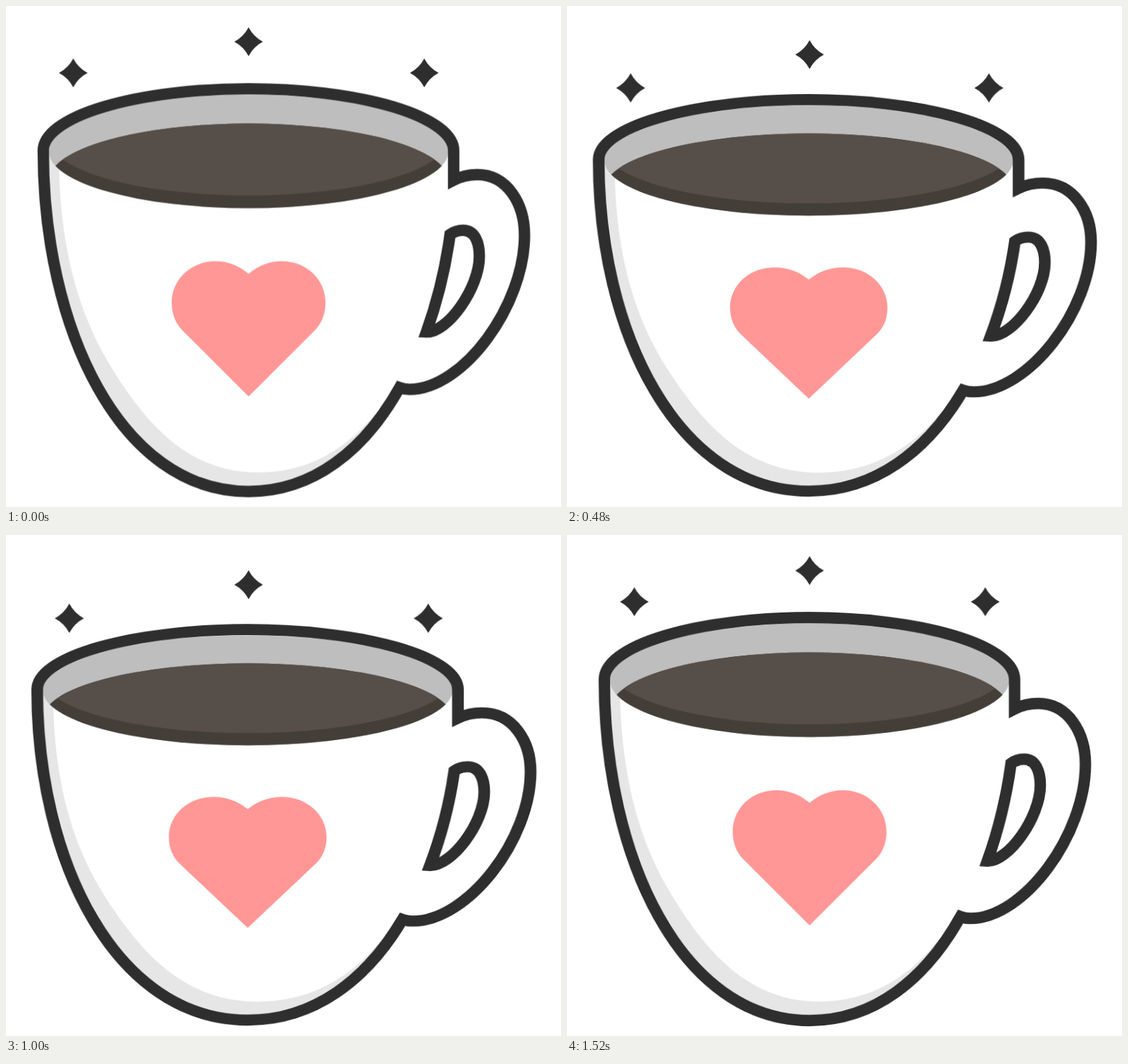
Recreate the animation shown at these times as an HTML page. Size 787 by 711 pixels, loop 1.56 s.

```html
<!DOCTYPE html>
<html lang="en">
<head>
<meta charset="utf-8">
<title>Coffee cup</title>
<style>
  html, body { margin: 0; width: 100%; height: 100%; overflow: hidden; background: #fff; }
  svg { display: block; width: 787px; height: 711px; }

  .cup, .star {
    animation: .78s cubic-bezier(.333, .118, .667, .452) -25ms infinite alternate;
  }
  .cup { animation-name: squash; transform-origin: 393.5px 670px; }
  .star { fill: #2e2e2e; animation-name: sink; transform: translate(var(--x), var(--y)); }
  .left { --x: 95.5px; --y: 94.4px; --dx: -10.5px; --dy: 43.5px; --s: 1.03; }
  .mid { --x: 344px; --y: 50.2px; --dx: 0px; --dy: 37.3px; --s: 1; }
  .right { --x: 593px; --y: 94.4px; --dx: 10.5px; --dy: 43.5px; --s: 1.03; }

  .line { fill: none; stroke: #2e2e2e; stroke-width: 16.2; stroke-linejoin: miter; }

  @keyframes squash {
    from { transform: scale(1); }
    to { transform: scale(1.0474, .943); }
  }
  @keyframes sink {
    from { transform: translate(var(--x), var(--y)) scale(1); }
    to {
      transform: translate(calc(var(--x) + var(--dx)), calc(var(--y) + var(--dy))) scale(var(--s));
    }
  }
</style>
</head>
<body>
<svg viewBox="0 0 787 711">
  <defs>
    <path id="spark" d="M0-20.5Q7-7 20.3 0Q7 7 0 20.5Q-7 7-20.3 0Q-7-7 0-20.5Z"/>
    <ellipse id="rim" cx="344" cy="206" rx="283" ry="80.6"/>
    <clipPath id="inRim"><use href="#rim"/></clipPath>
    <clipPath id="inCoffee"><use href="#rim" y="41"/></clipPath>
  </defs>

  <g class="cup">
    <!-- shade -->
    <path fill="#e6e6e6" d="M53 205C53 457 162 689 344 689
      C420 689 480 645 524 590V578C480 632 425 662 357 662
      C257 662 197 591 148 510C98 428 75 330 75 205Z"/>

    <!-- inside and coffee -->
    <use href="#rim" fill="#bebebe"/>
    <g clip-path="url(#inRim)">
      <use href="#rim" y="41" fill="#443e39"/>
      <g clip-path="url(#inCoffee)">
        <use href="#rim" y="-18" fill="#564e48"/>
      </g>
    </g>

    <!-- heart -->
    <path fill="#ff9796" d="M344 380C330 368 314 362 297 362C262 362 235 388 235 421
      C235 436 240 450 250 460L344 554L438 460C448 450 453 436 453 421
      C453 388 426 362 391 362C374 362 358 368 344 380Z"/>

    <!-- outline, handle -->
    <path class="line" d="M53 205A290.8 88 0 0 1 634.6 205V246.8C645 241.5 656 239 668 239
      C711 239 735 281 735 325C735 425 648 544 572 544C567 544 562 543 558 541.5
      C508 631 435 689 344 689C162 689 53 457 53 205Z"/>
    <path class="line" d="M629.5 324C635 320 642 318 648 318C664 318 671 334 671 355
      C671 401 625 464 596 462.5Q620 395 629.5 324Z"/>
  </g>

  <use class="star left" href="#spark"/>
  <use class="star mid" href="#spark"/>
  <use class="star right" href="#spark"/>
</svg>
</body>
</html>
```
